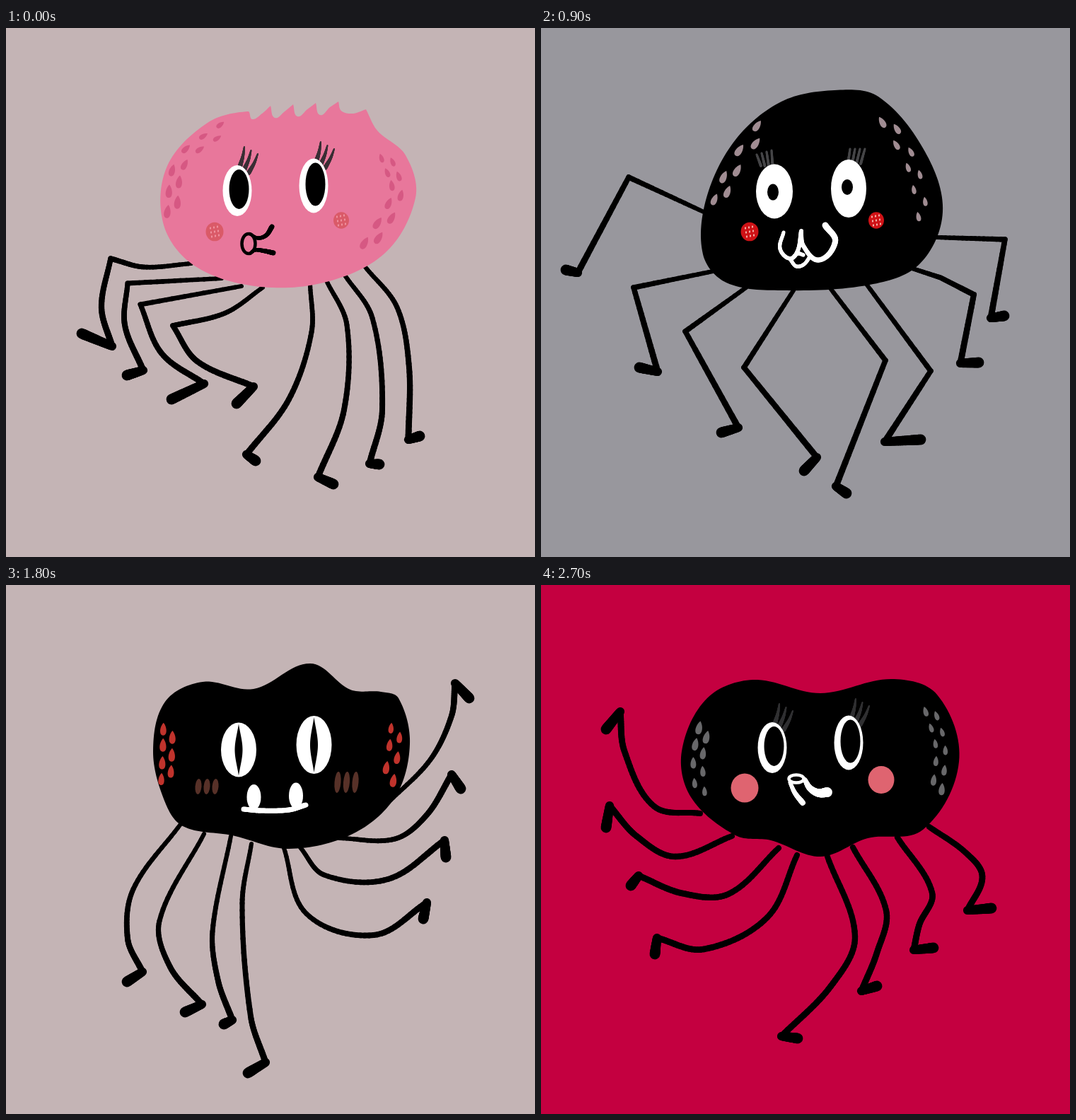
An HTML page with a canvas for the animation above (3150 ms loop, 748 px wide and 748 px high).

```html
<!DOCTYPE html>
<html lang="en">
<head>
<meta charset="utf-8">
<title>Little spiders</title>
<style>
html, body { margin: 0; width: 100%; height: 100%; overflow: hidden; }
canvas { display: block; width: 100vw; height: 100vh; }
</style>
</head>
<body>
<canvas id="stage" width="748" height="748"></canvas>
<script>
const SIZE = 748, HOLD = 450;
const ctx = document.getElementById('stage').getContext('2d');
ctx.lineCap = ctx.lineJoin = 'round';

const LILAC = '#b1b2c7', CHEEK = '#df6470', CRIMSON = '#c40040';
const GREY = '#98979d', MAUVE = '#c4b4b5', BLACK = '#000', WHITE = '#fff';

// "x,y x,y!" becomes points; a "!" marks a sharp corner (stored twice).
function parse(text, sharp) {
  return text.trim().split(/\s+/).flatMap(token => {
    const point = token.replace('!', '').split(',').map(Number);
    return sharp || token.endsWith('!') ? [point, point] : [point];
  });
}

// Samples a smooth curve through the points.
function trace(pts, closed) {
  const n = pts.length, out = [];
  const at = i => closed ? pts[(i + n) % n] : pts[Math.max(0, Math.min(n - 1, i))];
  const unit = (a, b) => {
    const d = Math.hypot(b[0] - a[0], b[1] - a[1]) || 1;
    return [(b[0] - a[0]) / d, (b[1] - a[1]) / d];
  };
  for (let i = 0; i < (closed ? n : n - 1); i++) {
    const a = at(i), b = at(i + 1);
    const reach = Math.hypot(b[0] - a[0], b[1] - a[1]) / 3;
    if (!reach) continue;
    const u = unit(at(i - 1), b), v = unit(a, at(i + 2));
    for (let s = 0; s < 16; s++) {
      const t = s / 16, r = 1 - t;
      out.push([0, 1].map(k =>
        r * r * r * a[k] + 3 * r * r * t * (a[k] + u[k] * reach) +
        3 * r * t * t * (b[k] - v[k] * reach) + t * t * t * b[k]));
    }
  }
  if (!closed) out.push(at(n - 1));
  return out;
}

function shape(color, text) {
  ctx.fillStyle = color;
  ctx.beginPath();
  trace(parse(text), true).forEach(p => ctx.lineTo(...p));
  ctx.fill();
}

// Brush line whose width runs from w0 to w1.
function stroke(color, pts, w0, w1 = w0) {
  ctx.strokeStyle = color;
  for (let i = 1; i < pts.length; i++) {
    ctx.lineWidth = w0 + (w1 - w0) * i / pts.length;
    ctx.beginPath();
    ctx.moveTo(...pts[i - 1]);
    ctx.lineTo(...pts[i]);
    ctx.stroke();
  }
}

const brush = (color, text, w0, w1) => stroke(color, trace(parse(text)), w0, w1);

function oval(color, x, y, rx, ry = rx, angle = 0) {
  ctx.fillStyle = color;
  ctx.beginPath();
  ctx.ellipse(x, y, rx, ry, angle, 0, 7);
  ctx.fill();
}

function ring(color, x, y, rx, ry, width) {
  ctx.strokeStyle = color;
  ctx.lineWidth = width;
  ctx.beginPath();
  ctx.ellipse(x, y, rx, ry, 0, 0, 7);
  ctx.stroke();
}

// A leg runs from hip to ankle; its last point is the toe.
function leg(text, [w0, w1], sharp) {
  const pts = parse(text, sharp), toe = pts.at(-1);
  const path = pts.slice(0, sharp ? -2 : -1);
  stroke(BLACK, trace(path), w0, w1);
  stroke(BLACK, trace([path.at(-1), toe]), 12, 15);
}

// Teardrops in two staggered rows along a curve, tips towards its start.
function speckles(color, count, text) {
  const line = trace(parse(text));
  ctx.fillStyle = color;
  for (let i = 0; i < count; i++) {
    const k = Math.round(i / (count - 1) * (line.length - 2));
    const [x, y] = line[k], [nx, ny] = line[k + 1];
    const h = 8 + 1.5 * Math.sin(i * 12.9 + count), w = h * .62;
    ctx.save();
    ctx.translate(x, y);
    ctx.rotate(Math.atan2(x - nx, ny - y));
    ctx.translate(i % 2 ? 6.5 : -6.5, 0);
    ctx.beginPath();
    ctx.moveTo(0, -h);
    ctx.bezierCurveTo(w, -h * .3, w * 1.1, h, 0, h);
    ctx.bezierCurveTo(-w * 1.1, h, -w, -h * .3, 0, -h);
    ctx.fill();
    ctx.restore();
  }
}

function slitEyes(w) {
  for (const [x, y, ry] of [[329, 233, 38.5], [435.5, 226, 41]]) {
    oval(WHITE, x, y, 25, ry);
    shape(BLACK, `${x},${y - ry + 2}! ${x + w},${y} ${x},${y + ry - 2}! ${x - w},${y}`);
  }
}

function longEyes(lash) {
  for (const [x, y, ry] of [[327, 230, 36], [435, 223, 38.5]]) {
    for (let i = 0; i < 3; i++)
      brush(lash, `${x + 4 + 6 * i},${y - 35 + 5 * i} ${x + 8 + 8 * i},${y - 49 + 5 * i}
        ${x + 10 + 9.5 * i},${y - 62 + 5 * i}`, 6.5, 2);
    oval(WHITE, x, y, 20.5, ry);
    oval(BLACK, x + 2.5, y - 2, 14, ry - 8);
  }
}

function roundCheeks() {
  oval(CHEEK, 288, 287, 19.5, 20.5);
  oval(CHEEK, 481, 275.5, 18.5, 19.5);
}

function dottedCheeks(color, dot) {
  for (const [x, y, r] of [[295, 288, 12.5], [474, 272, 11]]) {
    oval(color, x, y, r, r + .8);
    for (let row = -1; row <= 1; row++)
      for (let col = -1; col <= 1; col++)
        oval(dot, x + col * 5 + row, y + row * 6 - col, 1.1, 1.7);
  }
}

function heart(x, y, w, h) {
  ctx.fillStyle = '#ff0a3c';
  ctx.beginPath();
  ctx.moveTo(x, y + h * .22);
  for (const side of [1, -1]) {
    const from = side > 0 ? [0, .22] : [-.06, 1], to = side > 0 ? [-.06, 1] : [0, .22];
    const a = [.15 * side, -.12], b = [.95 * side, -.12], mid = [.48 * side, .2];
    const px = p => [x + p[0] * w, y + p[1] * h];
    const top = [[.12 * side, -.05], [.5 * side, -.08]], low = [[.47 * side, .42], [.12 * side, .75]];
    if (side > 0) {
      ctx.bezierCurveTo(...px(top[0]), ...px(top[1]), ...px(mid));
      ctx.bezierCurveTo(...px(low[0]), ...px(low[1]), ...px(to));
    } else {
      ctx.bezierCurveTo(...px(low[1]), ...px(low[0]), ...px(mid));
      ctx.bezierCurveTo(...px(top[1]), ...px(top[0]), ...px(to));
    }
  }
  ctx.fill();
}

// Four-pointed star with hollow sides.
function star(x, y, rx, ry) {
  ctx.fillStyle = BLACK;
  ctx.beginPath();
  for (let i = 0; i < 8; i++) {
    const a = i * Math.PI / 4, r = i % 2 ? .42 : 1;
    ctx.lineTo(x + rx * r * Math.cos(a), y + ry * r * Math.sin(a));
  }
  ctx.fill();
}

function spikes() {
  let crest = '';
  for (let i = 0; i < 4; i++)
    crest += `${348 + 32 * i},${129 - 2 * i} ${362 + 32 * i},${121 - 3 * i} ${374 + 32 * i},${110 - 2 * i}! `;
  return crest;
}

const scenes = [
  {
    back: MAUVE, skin: '#e8779b', widths: [6, 9],
    body: `342,118 ${spikes()} 474,117 490,121 509,115! 525,145 565,180 579,240 535,319
      445,361 345,364 262,333 222,275 228,195 285,134`,
    legs: ['262,333 195,338 148,326! 135,395 150,450 107,432', '305,354 172,361! 168,420 194,484 171,491',
      '333,365 190,391! 220,460 280,503 234,525', '363,367 310,403 236,421! 270,471 350,507 326,531',
      '430,362 432,430 400,525 340,603 353,612', '453,357 482,420 478,540 441,635 463,645',
      '478,348 518,410 532,540 514,616 528,617', '508,338 553,395 570,480 569,582 585,577'],
    spots: ['#d65883', [11, '307,142 247,190 234,265'], [11, '537,182 552,235 510,312']],
    face() {
      longEyes('#3a2f35');
      dottedCheeks('#da5a68', '#f0929f');
      brush(BLACK, '345,291 356,297 368,293 376,281', 4, 7);
      brush(BLACK, '345,319 352,314 364,315 378,318', 4, 7);
      ring(BLACK, 343, 305, 9.5, 14, 4.5);
    }
  },
  {
    back: CRIMSON, skin: LILAC, widths: [7, 9],
    body: `391,83! 397,100 420,121 505,138 552,185 567,235 515,323 395,359 285,326 225,255
      228,190 300,131 378,99`,
    legs: ['268,316 205,405 180,510 191,591 173,603', '283,327 218,440 214,530 228,603 211,609',
      '303,338 258,450 260,570 292,643 273,657', '320,348 297,480 310,570 341,633 325,648',
      '392,360 398,420 445,507 514,541 500,560', '428,356 455,455 505,482 565,485 555,506',
      '458,350 510,405 560,416 602,409 596,425', '495,335 525,360 570,368 628,348 624,365'],
    spots: ['#8b8c9c', [14, '371,108 280,152 236,262'], [11, '465,142 530,190 541,282']],
    face() {
      slitEyes(6.5);
      roundCheeks();
      const red = '#f81414';
      brush(red, '333,293 345,300 375,303 401,295', 3, 5);
      brush(red, '341,303 343,318! 350,304', 4);
      brush(red, '377,305 380,321! 388,304', 4);
    }
  },
  {
    back: GREY, skin: BLACK, widths: [6, 9], sharp: true,
    body: `415,88 340,104 275,158 234,240 229,320 262,360 340,371 465,363 535,334 568,260 543,175 477,97`,
    legs: ['230,260 124,211 52,346 35,342', '522,339 565,353 612,377 593,474 619,473',
      '290,367 204,429 279,565 255,572', '409,368 487,470 417,648 432,658',
      '243,344 131,367 165,486 139,480', '357,371 287,480 390,607 372,626',
      '460,362 551,485 486,585 537,582', '560,296 656,299 636,410 655,407'],
    spots: ['#a08c92', [7, '311,142 272,198 250,248'], [9, '488,130 525,195 541,270']],
    face() {
      for (let i = 0; i < 4; i++) {
        brush('#454547', `${305 + 7 * i},${179 - 2 * i} ${311 + 5.5 * i},195`, 3, 4);
        brush('#454547', `${437 + 7 * i},171 ${434 + 6 * i},192`, 3, 4);
      }
      oval(WHITE, 330, 231, 26, 38.5);
      oval(WHITE, 435, 227, 25, 41);
      oval(BLACK, 328, 232, 8, 11.5);
      oval(BLACK, 433, 225, 8, 11);
      dottedCheeks('#cf1216', '#f4b0a8');
      brush(WHITE, '343,289 338,312 352,326 363,315 368,287', 5, 6);
      brush(WHITE, '368,287 371,308 393,328 416,302 402,279', 5, 9);
      brush(WHITE, '353,328 361,337 372,334 381,322', 5);
      brush(WHITE, '354,327 363,319 371,321', 5);
    }
  },
  {
    back: '#e78f9d', skin: '#d9dadc', widths: [6, 9],
    body: `398,95 325,118 265,200 244,280 265,328 350,360 432,370 500,350 543,285 542,205 505,142 440,102`,
    legs: ['284,339 225,382 160,394 108,375 106,393', '305,350 245,412 180,436 120,433 118,455',
      '327,358 285,450 215,492 142,498 142,520', '360,363 320,490 240,570 170,571 169,595',
      '408,368 410,500 430,560 470,607 446,637', '433,370 442,440 500,533 537,544 522,562',
      '463,361 490,425 555,465 594,466 581,480', '502,347 560,410 610,421 656,412 650,431'],
    spots: [WHITE, [10, '337,126 286,180 258,253'], [13, '482,138 516,200 518,295']],
    face() {
      heart(328, 199, 45, 70);
      heart(437, 191, 47, 82);
      oval('#df8562', 285, 282, 17.5, 19);
      oval('#df8562', 485, 277, 18.5, 16.5);
      brush(BLACK, '366,298 367,316 373,329 379,324 383,304', 6, 7);
      brush(BLACK, '383,304 386,325 391,330 397,323 395,295', 7, 9);
    }
  },
  {
    back: MAUVE, skin: BLACK, widths: [6, 9],
    body: `278,137 225,165 208,235 224,305 250,341 320,354 400,373 490,352 550,300 571,225 555,160
      530,151 487,148 430,111 350,147`,
    legs: ['247,338 180,430 172,500 193,547 171,561', '280,352 217,475 232,540 277,593 253,604',
      '318,355 292,490 300,560 320,615 308,621', '347,366 334,450 346,610 367,675 342,690',
      '393,372 425,465 520,495 595,449 590,472', '416,371 450,410 540,416 620,361 622,385',
      '472,358 550,359 595,325 630,268 643,288', '540,308 600,247 630,185 635,139 655,160'],
    spots: ['#c0332c', [7, '229,204 228,240 226,277'], [6, '551,203 548,235 541,278']],
    face() {
      slitEyes(5.5);
      for (let i = 0; i < 3; i++) {
        oval('#573128', 272 + 12 * i, 285, 4.5, 11, .08);
        oval('#573128', 469 + 12.5 * i, 279, 4.5, 15, .08);
      }
      brush(WHITE, '336,317 360,319 400,318 424,311', 7);
      oval(WHITE, 350.5, 300, 10, 18);
      oval(WHITE, 410, 298, 10, 18.5);
    }
  },
  {
    back: GREY, skin: LILAC, widths: [6, 9], sharp: true,
    body: `330,144 265,165 235,225 250,295 300,352 380,362 470,356 540,295 561,210 535,144 465,124 370,152`,
    legs: ['245,281 112,344 84,468 59,469', '268,317 129,377 124,543 101,545',
      '290,346 152,399 232,508 196,527', '330,365 215,424 333,496 310,541',
      '408,359 441,471 369,646 387,646', '438,360 508,445 444,559 471,564',
      '475,352 557,406 545,527 575,519', '512,329 588,345 628,523 656,511'],
    spots: [WHITE, [10, '287,168 252,215 255,287'], [9, '513,150 537,205 530,287']],
    face() {
      oval(WHITE, 329.5, 230.5, 23, 38.5);
      oval(WHITE, 433, 226.5, 24, 43);
      star(328.5, 231, 21, 33);
      star(433, 225, 20, 38);
      roundCheeks();
      const red = '#e02b20';
      brush(red, '362,314 367,302 374,298 378,305 384,299 391,303 394,314', 4);
      brush(red, '360,316 380,314 398,314', 5);
      brush(red, '365,317 371,328 380,329 390,317', 4);
      brush(red, '378,305 377,314', 4);
    }
  },
  {
    back: CRIMSON, skin: BLACK, widths: [8, 9],
    body: `300,134 235,160 199,235 212,300 275,354 325,361 395,384 462,358 540,346 591,250 560,155
      495,133 395,153`,
    legs: ['225,323 160,313 118,235 112,179 92,204', '270,355 190,384 135,355 97,312 92,343',
      '336,372 265,437 200,436 138,411 127,425', '362,382 320,470 230,515 164,499 161,522',
      '405,384 444,497 410,567 340,638 363,641', '441,371 488,460 475,520 453,574 475,567',
      '504,357 553,435 535,480 527,516 555,513', '549,342 600,378 624,412 603,460 637,457'],
    spots: ['#68686a', [8, '230,203 222,245 225,295'], [10, '550,177 565,230 560,292']],
    face() {
      longEyes('#303032');
      roundCheeks();
      brush(WHITE, '352,279 359,294 370,308', 5, 8);
      brush(WHITE, '373,275 380,287 392,294 405,293', 6, 14);
      ring(WHITE, 361, 274, 10.5, 5.5, 4.5);
    }
  }
];

function draw({ back, skin, body, legs, widths, sharp, spots: [color, ...rows], face }) {
  ctx.fillStyle = back;
  ctx.fillRect(0, 0, SIZE, SIZE);
  legs.forEach(text => leg(text, widths, sharp));
  shape(skin, body);
  rows.forEach(row => speckles(color, ...row));
  face();
}

const start = performance.now();
let shown = -1;

function tick() {
  const index = Math.floor((performance.now() - start) / HOLD) % scenes.length;
  if (index !== shown) draw(scenes[shown = index]);
  requestAnimationFrame(tick);
}
tick();
</script>
</body>
</html>
```
